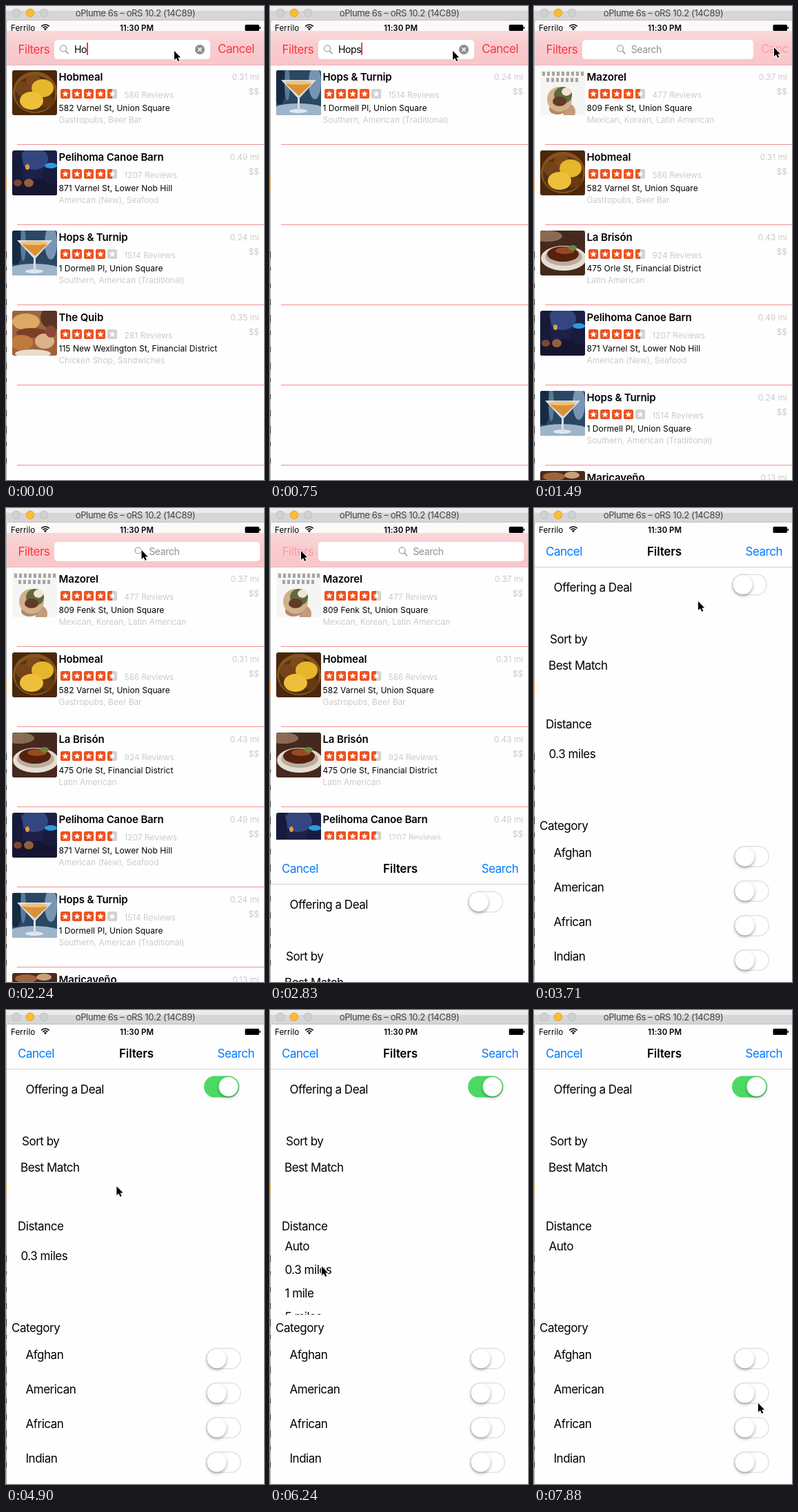
These frames come from a looping animation (374 by 686 pixels, 8 s). An HTML page with a canvas:

```html
<!DOCTYPE html>
<html lang="en">
<head>
<meta charset="utf-8">
<title>Restaurant search</title>
<style>
html, body { margin: 0; width: 100%; height: 100%; overflow: hidden; background: #fff; }
canvas { display: block; }
</style>
</head>
<body>
<canvas id="stage" width="374" height="686"></canvas>
<script>
const ctx = document.getElementById('stage').getContext('2d');
const LOOP = 8000, STEP = 148.3;
const RED = '#fb363c', BLUE = '#007aff', GRAY = '#8e8e93', PALE = '#bdbdc0';

// Photos: background, then ellipses [color, cx, cy, rx, ry] in a 65 px square.
const photos = {
  bowl: ['#4a280d', ['#85521c', 33, 32, 32, 30], ['#50300f', 33, 34, 29, 26], ['#74431a', 17, 27, 12, 11],
    ['#7d4a1d', 31, 15, 11, 8], ['#69390f', 50, 45, 11, 9], ['#e6b62c', 44, 26, 16, 13], ['#eebf3a', 28, 44, 17, 13]],
  night: ['#1d2149', ['#34467f', 32, 12, 20, 16], ['#161630', 30, 58, 50, 17], ['#171a3a', 7, 26, 9, 28],
    ['#181b3c', 56, 36, 13, 12], ['#2b9be0', 56, 22, 9, 4], ['#e09a50', 22, 24, 3, 4], ['#93603f', 24, 47, 7, 6],
    ['#7a4638', 8, 47, 6, 5]],
  drink: ['#2a4763', ['#162a42', 5, 22, 9, 28], ['#577a9b', 16, 20, 4, 24], ['#7795b2', 56, 18, 9, 24],
    ['#9db4c9', 32, 62, 46, 14], ['#dfe8ef', 32, 59, 13, 3]],
  sandwich: ['#a0623e', ['#5b3327', 60, 10, 19, 17], ['#dca963', 20, 16, 20, 12], ['#7b3f27', 28, 32, 22, 7],
    ['#dcb389', 47, 44, 14, 11], ['#c07a40', 14, 46, 16, 11], ['#8c4a36', 56, 30, 8, 9], ['#eadccd', 30, 62, 26, 6]],
  taco: ['#f5f5f4', ['#c39a7b', 42, 60, 9, 11], ['#b08868', 25, 56, 12, 8], ['#d3b08b', 28, 42, 18, 18],
    ['#5e6a3e', 33, 36, 13, 12], ['#f0e4cf', 38, 31, 7, 6], ['#63392a', 28, 45, 10, 7]],
  plate: ['#45291e', ['#8a6a52', 10, 8, 22, 8], ['#e6ddd2', 34, 40, 33, 18], ['#bcae9f', 34, 38, 27, 13],
    ['#55220f', 33, 34, 23, 11], ['#9a481f', 36, 29, 14, 5], ['#6d8440', 47, 25, 6, 4]],
  table: ['#4b2a1e', ['#a0643c', 20, 8, 16, 6], ['#c9a076', 46, 6, 11, 5]]
};

const place = (name, photo, miles, rating, reviews, address, food) =>
  ({ name, photo, miles, rating, reviews, address, food });
const mazorel = place('Mazorel', 'taco', '0.37', 4.5, 477, '809 Fenk St, Union Square', 'Mexican, Korean, Latin American');
const hobmeal = place('Hobmeal', 'bowl', '0.31', 4.5, 586, '582 Varnel St, Union Square', 'Gastropubs, Beer Bar');
const brison = place('La Brisón', 'plate', '0.43', 4.5, 924, '475 Orle St, Financial District', 'Latin American');
const canoe = place('Pelihoma Canoe Barn', 'night', '0.49', 4.5, 1207, '871 Varnel St, Lower Nob Hill', 'American (New), Seafood');
const hops = place('Hops & Turnip', 'drink', '0.24', 4, 1514, '1 Dormell Pl, Union Square', 'Southern, American (Traditional)');
const quib = place('The Quib', 'sandwich', '0.35', 4, 281, '115 New Wexlington St, Financial District', 'Chicken Shop, Sandwiches');
const marica = place('Maricaveño', 'table', '0.13', 4, 1630, '73 Ostrel St, Union Square', 'Mexican, Bars');
const everything = [mazorel, hobmeal, brison, canoe, hops, marica];

// Tracks of [step, value, ...], interpolated linearly.
const pointer = [[4, 244, 65], [5, 265, 65], [6, 279, 61], [7, 279, 61], [9, 345, 60], [10, 348, 60], [12, 348, 60],
  [18, 45, 62], [21, 45, 62], [25, 238, 135], [27, 308, 110], [30, 308, 110], [35, 62, 352], [38, 62, 352],
  [39, 98, 385], [42, 75, 371], [43, 67, 348], [48, 67, 348], [52, 316, 575], [53, 325, 569]];
const barGrow = [[9, 0], [10, .305], [11, .85], [12, 1]];
const hintShift = [[9, 78], [10, 120], [11, 175], [12, 186.5]];
const sheetTop = [[18, 665], [19, 459], [20, 150], [21, 28], [22, 0]];
const dealSwitch = [[28, 0], [29, .5], [30, 1]];

function at(track, k) {
  const i = track.findIndex(key => key[0] >= k);
  if (i < 0) return track[track.length - 1].slice(1);
  if (i === 0) return track[0].slice(1);
  const a = track[i - 1], b = track[i], p = (k - a[0]) / (b[0] - a[0]);
  return a.slice(1).map((v, j) => v + (b[j + 1] - v) * p);
}

// Small and bold text is set looser than large regular text.
function text(s, x, y, size = 17, color = '#000', weight = 400, align = 'left') {
  const tracking = size < 13 ? .004 : weight > 400 ? -.01 : -.028;
  ctx.font = `${weight} ${size}px Inter, sans-serif`;
  ctx.letterSpacing = size * tracking + 'px';
  ctx.textAlign = align;
  ctx.fillStyle = color;
  ctx.fillText(s, x, y);
}

function rect(x, y, w, h, color) {
  ctx.fillStyle = color;
  ctx.fillRect(x, y, w, h);
}

function round(x, y, w, h, r, color) {
  ctx.beginPath();
  ctx.roundRect(x, y, w, h, r);
  ctx.fillStyle = color;
  ctx.fill();
}

function ellipse(color, x, y, rx, ry = rx) {
  ctx.beginPath();
  ctx.ellipse(x, y, rx, ry, 0, 0, 7);
  ctx.fillStyle = color;
  ctx.fill();
}

function polygon(color, ...points) {
  ctx.beginPath();
  points.forEach(([x, y]) => ctx.lineTo(x, y));
  ctx.closePath();
  ctx.fillStyle = color;
  ctx.fill();
}

function line(color, width, ...points) {
  ctx.beginPath();
  points.forEach(([x, y]) => ctx.lineTo(x, y));
  ctx.strokeStyle = color;
  ctx.lineWidth = width;
  ctx.stroke();
}

function clipped(x, y, w, h, draw, r = 0) {
  ctx.save();
  ctx.beginPath();
  ctx.roundRect(x, y, w, h, r);
  ctx.clip();
  draw();
  ctx.restore();
}

function photo(name, x, y) {
  const [back, ...blobs] = photos[name];
  clipped(x, y, 65, 65, () => {
    ctx.translate(x, y);
    rect(0, 0, 65, 65, back);
    blobs.forEach(b => ellipse(...b));
    if (name === 'taco') {
      for (let i = 0; i < 9; i++) {
        rect(3 + i * 7, 2, 4, 6, '#a5a5a5');
        if (i > 0 && i < 8) rect(2 + i * 7, 11, 4, 6, '#a5a5a5');
      }
    }
    if (name === 'drink') {
      polygon('#d8e0e6', [7, 14], [58, 14], [34, 40], [34, 59], [31, 59], [31, 40]);
      polygon('#dc9136', [14, 20], [51, 20], [33, 37]);
      ellipse('#efc27a', 32, 18, 20, 3);
    }
  }, 3);
}

function stars(rating, x, y) {
  for (let i = 0; i < 5; i++, x += 17) {
    const fill = Math.min(1, Math.max(0, rating - i));
    round(x, y, 14, 14, 2.5, '#d2d2d2');
    clipped(x, y, 14 * fill, 14, () => round(x, y, 14, 14, 2.5, '#ee5220'));
    polygon('#fff', ...Array.from({ length: 10 }, (_, n) => {
      const a = n * Math.PI / 5, r = n % 2 ? 2.1 : 5;
      return [x + 7 + r * Math.sin(a), y + 7.3 - r * Math.cos(a)];
    }));
  }
}

function row(p, y) {
  photo(p.photo, 9, y + 8);
  text(p.name, 76.5, y + 23, 15, '#000', 600);
  text(p.miles + ' mi', 367, y + 21.5, 12, PALE, 300, 'right');
  text('$$', 367, y + 42.5, 12, PALE, 300, 'right');
  stars(p.rating, 79, y + 35);
  text(p.reviews + ' Reviews', 171.5, y + 48, 12, PALE, 300);
  text(p.address, 76.5, y + 67, 12);
  text(p.food, 76.5, y + 84, 12, PALE, 300);
}

function searchBar(k) {
  const [grow] = at(barGrow, k), [hint] = at(hintShift, k);
  const pink = ctx.createLinearGradient(0, 36, 0, 86);
  pink.addColorStop(0, '#f8d8da');
  pink.addColorStop(.4, '#f9cdd0');
  pink.addColorStop(1, '#f9c5c9');
  rect(0, 21, 374, 15, '#fdf9f9');
  rect(0, 36, 374, 49, pink);
  rect(0, 85, 374, 1, '#e6b9bc');

  ctx.globalAlpha = k < 18 ? 1 : .3;
  text('Filters', 17.5, 69, 17, RED);
  ctx.globalAlpha = Math.max(0, 1 - grow * 2.3);
  clipped(300, 40, 68, 40, () => text('Cancel', 307 + 72 * grow, 68, 17, RED));
  ctx.globalAlpha = 1;

  round(70, 49, 226 + 72 * grow, 28, 5, '#fff');
  ctx.beginPath();
  ctx.arc(hint + 5, 61.5, 4.5, 0, 7);
  ctx.strokeStyle = GRAY;
  ctx.lineWidth = 1.1;
  ctx.stroke();
  line(GRAY, 1.3, [hint + 8.3, 65], [hint + 12.5, 69.2]);

  const query = k < 1 ? 'Ho' : k < 2 ? 'Hop' : k < 7 ? 'Hops' : '';
  if (query) {
    text(query, 99, 68, 14);
    rect(Math.round(99 + ctx.measureText(query).width), 53, 2, 18, RED);
    ellipse(GRAY, 281, 63, 7);
    line('#fff', 1.5, [278.3, 60.3], [283.7, 65.7]);
    line('#fff', 1.5, [283.7, 60.3], [278.3, 65.7]);
  } else {
    text('Search', hint + 20.7, 68, 14, GRAY);
    if (k < 9) rect(99, 53, 2, 18, RED);
  }
}

function toggle(x, y, on) {
  round(x, y, 51, 31, 15.5, '#e3e3e3');
  ctx.globalAlpha = 1 - on;
  round(x + 1.5, y + 1.5, 48, 28, 14, '#fff');
  ctx.globalAlpha = on;
  round(x, y, 51, 31, 15.5, '#4cd964');
  ctx.globalAlpha = 1;
  ctx.save();
  ctx.shadowColor = 'rgba(0,0,0,.35)';
  ctx.shadowBlur = 4;
  ctx.shadowOffsetY = 2;
  ellipse('#fff', x + 15.5 + 20 * on, y + 15.5, 14);
  ctx.restore();
}

function filterSheet(k) {
  const [top] = at(sheetTop, k);
  ctx.save();
  ctx.translate(0, top);
  rect(0, 21, 374, 665, '#fefefe');
  rect(0, 85, 374, 1, '#cfcfcf');
  text('Cancel', 17, 69, 17, BLUE);
  text('Filters', 189, 69, 17, '#000', 600, 'center');
  text('Search', 360, 69, 17, BLUE, 400, 'right');

  text('Offering a Deal', 28.5, 121);
  toggle(287, 95.5, at(dealSwitch, k)[0]);
  text('Sort by', 23, 196);
  text('Best Match', 21, 233.5);
  text('Distance', 17, 319);
  if (k < 37) text('0.3 miles', 21.5, 361.5);
  else clipped(0, 325, 374, 116, () => {
    const choices = ['Auto', '0.3 miles', '1 mile', '5 miles'];
    choices.slice(0, k < 44 ? 4 : 1).forEach((s, i) => text(s, 21.5, 348 + 34 * i));
  });
  text('Category', 8, 466);
  ['Afghan', 'American', 'African', 'Indian'].forEach((s, i) => {
    text(s, 28.5, 505 + 50 * i);
    toggle(290, 489 + 50 * i, 0);
  });
  ctx.restore();
}

function statusBar() {
  text('Ferrilo', 7, 35.5, 11.7);
  ctx.strokeStyle = '#000';
  ctx.lineWidth = 1.7;
  for (const r of [4.8, 8]) {
    ctx.beginPath();
    ctx.arc(57, 35, r, -Math.PI * .75, -Math.PI * .25);
    ctx.stroke();
  }
  polygon('#000', [57, 35.5], [54.9, 32.8], [57, 32], [59.1, 32.8]);
  text('11:30 PM', 189.5, 35.5, 11.4, '#000', 600, 'center');
  round(346.5, 27, 20.5, 9, 1.5, '#000');
  rect(367.5, 30, 1.5, 3, '#000');
}

function windowFrame() {
  rect(0, 0, 374, 7, '#ececec');
  rect(0, 7, 374, 14, '#d6d6d6');
  rect(0, 20, 374, 1, '#c2c2c2');
  [15, 35, 55].forEach(x => {
    ellipse(x === 35 ? '#dea034' : '#bdbdbd', x, 10, 6.2);
    ellipse(x === 35 ? '#fdbc30' : '#d0d0d0', x, 10, 5.4);
  });
  text('oPlume 6s – oRS 10.2 (14C89)', 187.5, 15, 13, '#444', 400, 'center');
  rect(0, 21, 1, 665, '#a8a8a8');
  for (let y = 355; y < 670; y += 23) rect(0, y, 1, 5 + y % 7, '#333');
  rect(0, 248, 1, 20, '#d9a050');
}

function cursor(x, y) {
  ctx.save();
  ctx.translate(x, y);
  ctx.lineJoin = 'round';
  ctx.beginPath();
  [[0, 0], [0, 13], [3, 10.3], [5.2, 15], [7.3, 14.1], [5.2, 9.6], [9.2, 9.4]].forEach(p => ctx.lineTo(...p));
  ctx.closePath();
  ctx.strokeStyle = '#fff';
  ctx.lineWidth = 2;
  ctx.stroke();
  ctx.fillStyle = '#000';
  ctx.fill();
  ctx.restore();
}

function draw(now) {
  const k = Math.floor(now % LOOP / STEP);
  rect(0, 0, 374, 686, '#fefefe');
  if (k < 22) {
    const results = k < 1 ? [hobmeal, canoe, hops, quib] : k < 7 ? [hops] : everything;
    results.forEach((p, i) => row(p, 85 + 116 * i));
    for (let y = 200; y < 686; y += 116) rect(16, y, 358, 1, '#f88f92');
    searchBar(k);
  }
  if (k > 18) filterSheet(k);
  statusBar();
  windowFrame();
  cursor(...at(pointer, k));
}

const start = performance.now();
function tick() {
  draw(performance.now() - start);
  requestAnimationFrame(tick);
}
tick();
</script>
</body>
</html>
```
